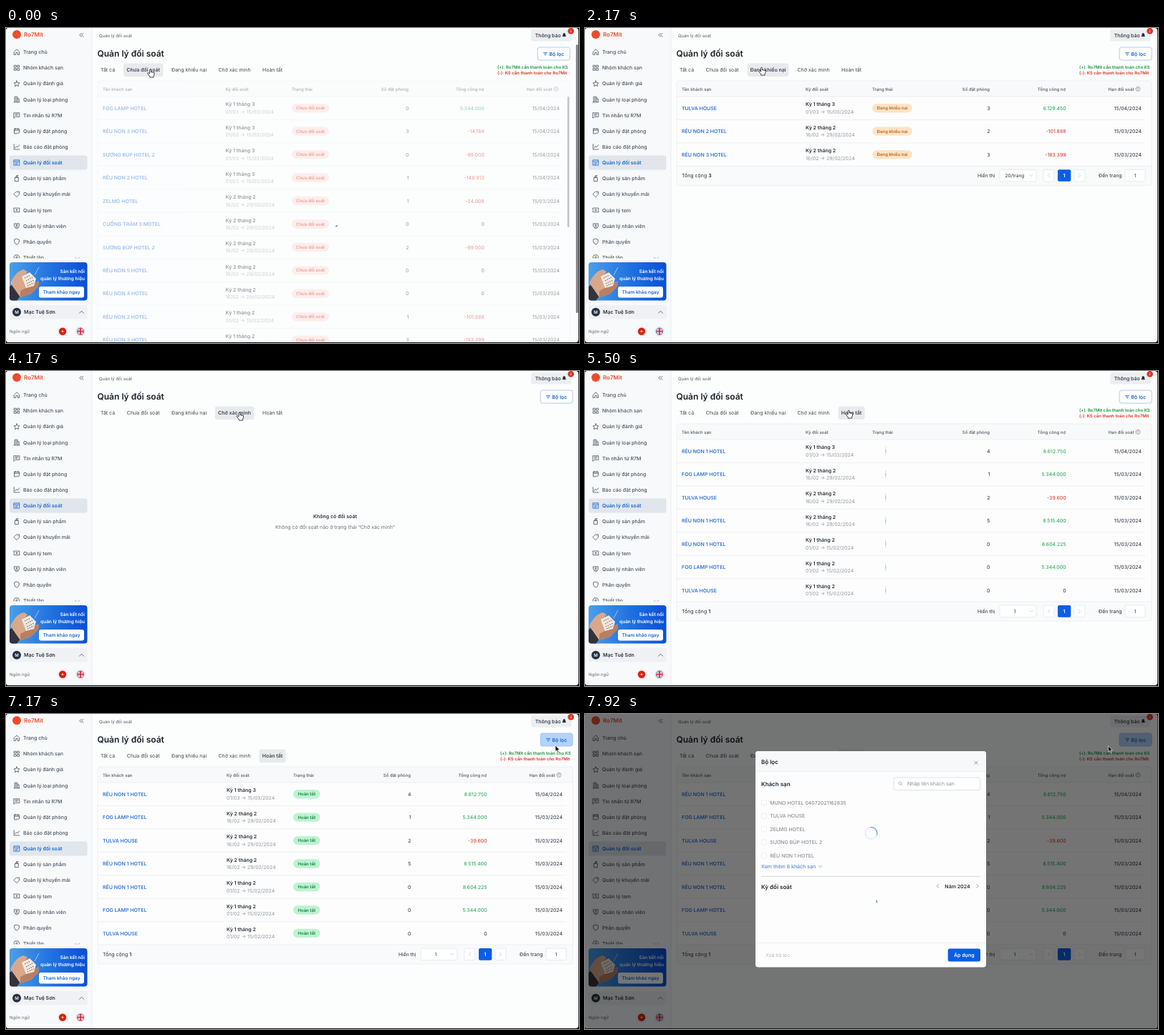
Animation of 800 by 441 pixels, one loop 8000 ms. Source, as an HTML page:

```html
<!DOCTYPE html>
<html lang="vi">
<head>
<meta charset="utf-8">
<title>Quản lý đối soát</title>
<style>
  html, body { margin: 0; width: 100%; height: 100%; overflow: hidden; background: #15171a; }
  svg { display: block; width: 800px; height: 441px; }
  text { font-family: Inter, sans-serif; text-rendering: geometricPrecision; white-space: pre; }
  .icon { fill: none; stroke: #46505e; stroke-width: .8; stroke-linecap: round; stroke-linejoin: round; }
  .badge { transform-box: fill-box; transform-origin: center; }
</style>
</head>
<body>
<svg id="stage" viewBox="0 0 800 441"></svg>
<script>
const LOOP = 8000;
const INK = '#28303b', GREY = '#9299a2', BLUE = '#1664d4', BUTTON = '#0b5de6',
      GREEN = '#16a34a', RED = '#d92d20', LINE = '#e8eaed', SCROLL = '#7d8085';

// Markup helpers
const text = (x, y, s, { size = 7, weight = 400, fill = INK, anchor = 'start' } = {}) =>
  `<text x="${x}" y="${y}" font-size="${size}" font-weight="${weight}" fill="${fill}" text-anchor="${anchor}">${s}</text>`;
const rect = (x, y, w, h, fill, rx = 0, stroke = 'none') =>
  `<rect x="${x}" y="${y}" width="${w}" height="${h}" rx="${rx}" fill="${fill}" stroke="${stroke}" stroke-width=".7"/>`;
const circle = (x, y, r, fill) => `<circle cx="${x}" cy="${y}" r="${r}" fill="${fill}"/>`;
const icon = (x, y, d, stroke = '#46505e') =>
  `<path class="icon" transform="translate(${x} ${y})" d="${d}" style="stroke:${stroke}"/>`;
const line = (x1, x2, y, stroke = LINE, w = .7) =>
  `<path d="M${x1} ${y}H${x2}" stroke="${stroke}" stroke-width="${w}"/>`;
const group = (id, body) => `<g id="${id}">${body}</g>`;

const LEFT = 'M1.2-2.4-1.2 0 1.2 2.4', RIGHT = 'M-1.2-2.4 1.2 0-1.2 2.4',
      DOWN = 'M-2-1 0 1 2-1', UP = 'M-3 1.5 0-1.5 3 1.5';

// Sidebar
const MENU = [
  ['Trang chủ', 'M-3.5-.5 0-3.8 3.5-.5V3.8H1.2V.8H-1.2v3H-3.5Z'],
  ['Nhóm khách sạn', 'M-3.5-3.5h2.6v2.6h-2.6ZM.9-3.5h2.6v2.6H.9ZM-3.5.9h2.6v2.6h-2.6ZM.9.9h2.6v2.6H.9Z'],
  ['Quản lý đánh giá', 'M0-4 1.2-1.3 4-1 1.9 1 2.5 3.8 0 2.3-2.5 3.8-1.9 1-4-1-1.2-1.3Z'],
  ['Quản lý loại phòng', 'M-3 3.8V-3.8H1V3.8M1-1H3.2V3.8M-4 3.8H4M-1.8-2h1.6M-1.8 0h1.6M-1.8 2h1.6'],
  ['Tin nhắn từ R7M', 'M-3.8-3.4H3.8V2.2H-1.8L-3.8 3.9ZM-2-1.6H2M-2 .2H1'],
  ['Quản lý đặt phòng', 'M-3.5-3H3.5V1M-3.5-3V3.6H.5M-3.5-1H3.5M-1.7-4v1.6M1.7-4v1.6M1 2.4 2.2 3.6 4 1.4'],
  ['Báo cáo đặt phòng', 'M-3.8-3.8V3.6H4M-2.4 1.6-.6-.8 1 .6 3.8-2.6'],
  ['Quản lý đối soát', 'M-3.7-3.7H3.7V3.7H-3.7ZM-3.7-1.7H3.7M-2 .2H1.8M-2 2H.8'],
  ['Quản lý sản phẩm', 'M-2.3-1.2H2.3V4H-2.3ZM-1.2-1.2V-2.8H1.2V-1.2M-.2-2.8V-4H2'],
  ['Quản lý khuyến mãi', 'M-.2-3.6 3.6-3.8 3.8 0-.2 3.8-3.9 0ZM1.7-1.9h.2'],
  ['Quản lý tem', 'M-3.9-2.8H3.9V-1Q2.9 0 3.9 1V2.8H-3.9V1Q-2.9 0-3.9-1ZM-1.2 0H1.2M0-1.2V1.2'],
  ['Quản lý nhân viên', 'M-3.3-3.2H3.3V.6Q3 2.6 0 4-3 2.6-3.3.6ZM-1-.9a1 1 0 1 0 2 0 1 1 0 1 0-2 0M-1.7 2Q0 .4 1.7 2'],
  ['Phân quyền', 'M0-4 3.3-2.8V0Q3 2.8 0 4-3 2.8-3.3 0V-2.8Z'],
  ['Thiết lập', 'M-2-3.4H2L4 0 2 3.4H-2L-4 0ZM-1.2 0a1.2 1.2 0 1 0 2.4 0 1.2 1.2 0 1 0-2.4 0'],
];

function menu() {
  return MENU.map(([label, d], i) => {
    const y = 33.6 + 22.13 * i, active = i === 7, color = active ? BLUE : '#46505e';
    return (active ? rect(5, y - 10, 108.5, 20, '#e0e6eb', 3) : '') + icon(15, y, d, color) +
      text(24, y + 2.6, label, { weight: active ? 600 : 500, fill: color });
  }).join('') + icon(99.5, 322.8, 'M-2.6-1.3 0 1.3 2.6-1.3');
}

function banner() {
  return rect(5, 328, 108.5, 53.5, 'url(#sky)', 4) +
    `<g clip-path="url(#bannerClip)">
      <path d="M5 362 11 358 20 375 15 382H5Z" fill="#34323d"/>
      <path d="M6 357Q14 340 25 338L30 341 25 348 40 357 46 354 45 362 35 372 20 377Z" fill="#d9a88c"/>
      <path d="M20 368 37 359 46 354 45 362 35 372 20 377Z" fill="#b97f62"/>
      <path d="M22 348 33 342 42 351 39 361 28 364Z" fill="#f1e8df"/>
      <path d="M26 350 34 346M28 354 37 349M29 358 39 353M30 361 39 357" stroke="#846f6a" stroke-width="1.2" stroke-dasharray="1.6 1.4"/>
      <path d="M40 346 46 335" stroke="#cfe3fb" stroke-width=".7"/>
    </g>` +
    text(110, 342.5, 'Sàn kết nối', { size: 6.5, weight: 600, fill: '#fff', anchor: 'end' }) +
    text(110, 352.5, 'quản lý thương hiệu', { size: 6.5, weight: 600, fill: '#fff', anchor: 'end' }) +
    rect(46, 362, 63, 15.5, '#fff', 3) +
    text(77.5, 372.1, 'Tham khảo ngay', { size: 6.5, weight: 600, fill: BLUE, anchor: 'middle' });
}

function flags() {
  const star = Array.from({ length: 10 }, (_, i) => {
    const r = i % 2 ? .9 : 2.2, a = Math.PI * (i / 5 - .5);
    return `${(79 + r * Math.cos(a)).toFixed(2)},${(424.7 + r * Math.sin(a)).toFixed(2)}`;
  }).join(' ');
  const cross = 'M98 424.7H110M104 418V431', diagonal = 'M99 420 109 430M109 420 99 430';
  return circle(79, 424.7, 7.5, '#eef0f2') + circle(104, 424.7, 7.5, '#eef0f2') +
    circle(79, 424.7, 5.2, '#d8201c') + `<polygon points="${star}" fill="#ffe14a"/>` +
    `<g clip-path="url(#flagClip)">${circle(104, 424.7, 6, '#21448f')}
      <path d="${diagonal}" stroke="#fff" stroke-width="1.8"/><path d="${diagonal}" stroke="#d3263a" stroke-width=".6"/>
      <path d="${cross}" stroke="#fff" stroke-width="3"/><path d="${cross}" stroke="#d3263a" stroke-width="1.7"/></g>`;
}

function sidebar() {
  return rect(0, 0, 120, 441, '#f8f9fb') + rect(119.6, 0, .7, 441, '#e4e7ea') +
    circle(15, 9, 6, '#ee4b2b') + text(25, 12.4, 'Ro7Mit', { size: 8, weight: 600, fill: '#ee4b2b' }) +
    icon(104, 9.7, LEFT) + icon(106.8, 9.7, LEFT) +
    `<g clip-path="url(#menuClip)">${menu()}</g>` + banner() +
    rect(5, 388, 108.5, 19.5, '#eff1f4', 3) + circle(15, 397.7, 6, '#273142') +
    text(15, 400, 'M', { size: 6, weight: 600, fill: '#fff', anchor: 'middle' }) +
    text(25, 400.3, 'Mạc Tuệ Sơn', { weight: 600 }) + icon(105.5, 397.7, UP) +
    text(5, 427, 'Ngôn ngữ', { size: 6, fill: '#5c6570' }) + flags();
}

// Tables
const PERIODS = {
  A: ['Kỳ 1 tháng 3', '01/03 → 15/03/2024', '15/04/2024'],
  B: ['Kỳ 2 tháng 2', '16/02 → 29/02/2024', '15/03/2024'],
  C: ['Kỳ 1 tháng 2', '01/02 → 15/02/2024', '15/03/2024'],
};
const FOG = 'FOG LAMP HOTEL', TULVA = 'TULVA HOUSE', BUD = 'SƯƠNG BÚP HOTEL 2', ZELMO = 'ZELMO HOTEL',
      moss = n => `RÊU NON ${n} HOTEL`;
const STATUS = {
  pending: ['Chưa đối soát', 52, '#fddcd8', '#d9341f'],
  dispute: ['Đang khiếu nại', 56, '#fde4c5', '#c5621c'],
  done: ['Hoàn tất', 37.5, '#bdf3d1', '#15803d'],
};
const ALL = [
  [FOG, 'A', 0, '5.344.000'], [moss(3), 'A', 3, '-14.184'], [BUD, 'A', 0, '-99.000'],
  [moss(2), 'A', 1, '-148.913'], [ZELMO, 'B', 1, '-24.008'], ['CUỐNG TRÀM 3 MOTEL', 'B', 0, '0'],
  [BUD, 'B', 2, '-99.000'], [moss(5), 'B', 0, '0'], [moss(4), 'B', 0, '0'],
  [moss(2), 'C', 1, '-101.888'], [moss(3), 'C', 3, '-183.399'],
];
const PENDING = [1, 2, 0, 3, 4, 6, 5, 7, 8, 9, 10].map(i => ALL[i]);
const DISPUTE = [[TULVA, 'A', 3, '6.129.450'], [moss(2), 'B', 2, '-101.888'], [moss(3), 'B', 3, '-183.399']];
const DONE = [
  [moss(1), 'A', 4, '8.612.750'], [FOG, 'B', 1, '5.344.000'], [TULVA, 'B', 2, '-39.600'],
  [moss(1), 'B', 5, '8.515.400'], [moss(1), 'C', 0, '8.604.225'], [FOG, 'C', 0, '5.344.000'], [TULVA, 'C', 0, '0'],
];
const NARROW = { period: 306.5, status: 399, count: 562.5, debt: 667.8, date: 773, right: 787 };
const WIDE = { period: 308, status: 401, count: 565.5, debt: 671.6, date: 777, right: 791.3 };
const PITCH = 32.45;

function row([name, key, count, debt], i, col, status) {
  const y = 112.2 + PITCH * i, [period, range, due] = PERIODS[key], [label, w, fill, ink] = STATUS[status];
  const debtColor = debt === '0' ? INK : debt[0] === '-' ? RED : GREEN;
  return text(135, y + 2.6, name, { weight: 500, fill: BLUE }) +
    text(col.period, y - 2.8, period, { weight: 600 }) + text(col.period, y + 7.5, range, { fill: GREY }) +
    `<g class="badge">${rect(col.status, y - 6.2, w, 12.4, fill, 6.2)}` +
    text(col.status + w / 2, y + 2.1, label, { size: 6, weight: 600, fill: ink, anchor: 'middle' }) + '</g>' +
    text(col.count, y + 2.6, count, { anchor: 'end' }) +
    text(col.debt, y + 2.6, debt, { fill: debtColor, anchor: 'end' }) +
    text(col.date, y + 2.6, due, { anchor: 'end' }) + line(128, col.right - 9, 96 + PITCH * (i + 1));
}

function pager(y, total, pageSize) {
  const box = (x, w) => rect(x, y - 8.3, w, 16.6, '#fff', 2, '#dfe2e6'), base = y + 2.6;
  return rect(128, y - 13.2, 663, 26.6, '#f9fafb', 3) + line(128, 791, y - 13.2) +
    text(135, base, `Tổng cộng <tspan font-weight="600">${total}</tspan>`) +
    text(548, base, 'Hiển thị', { size: 6.8 }) + box(579, 51) +
    text(600, base, pageSize, { size: 6.6, anchor: 'middle' }) + icon(623, y, DOWN, '#c3c8ce') +
    box(640, 15) + icon(647.5, y, LEFT, '#c3c8ce') +
    rect(660, y - 8.3, 18.3, 16.6, BUTTON, 2) + text(669, base, '1', { weight: 600, fill: '#fff', anchor: 'middle' }) +
    box(683, 15) + icon(690.5, y, RIGHT, '#c3c8ce') +
    text(717, base, 'Đến trang') + box(754, 28) + text(768, base, '1', { size: 6.6, anchor: 'middle' });
}

function table(id, rows, status, col, { footer, scroll }) {
  const head = (x, label, anchor) => text(x, 87.6, label, { size: 6, weight: 500, fill: '#4d5661', anchor });
  const height = footer ? PITCH * rows.length + 49 : 400, w = col.right - 128;
  return group(id,
    rect(128, 74, w, height, '#fdfdfe', 3) + rect(128, 74, w, 22, '#f8f9fa', 3) + line(128, col.right, 96) +
    head(135, 'Tên khách sạn') + head(col.period, 'Kỳ đối soát') + head(col.status, 'Trạng thái') +
    head(col.count - .5, 'Số đặt phòng', 'end') + head(col.debt - .5, 'Tổng công nợ', 'end') +
    head(col.date - 10.5, 'Hạn đối soát', 'end') +
    icon(col.date - 5, 85.3, 'M-3 0a3 3 0 1 0 6 0 3 3 0 1 0-6 0M-.9-.8Q-.6-1.7.3-1.5 1.2-1 0 0V.4M0 1.5v.1', '#8b929b') +
    rows.map((r, i) => row(r, i, col, status)).join('') +
    (footer ? pager(109.2 + PITCH * rows.length, ...footer) : rect(783.8, 96, 2.8, scroll, SCROLL, 1.4)) +
    rect(128, 74, w, height, 'none', 3, LINE));
}

// Page header
const TABS = [['Tất cả', 142, 28], ['Chưa đối soát', 191.7, 55.5], ['Đang khiếu nại', 255.6, 57.5],
              ['Chờ xác minh', 319, 54.5], ['Hoàn tất', 372, 37]];
function header() {
  const bell = 'M-2.7 1.7Q-1.9 1-1.9-.6-1.9-3 0-3.2 1.9-3 1.9-.6 1.9 1 2.7 1.7ZM-.7 2.8Q0 3.5.7 2.8Z';
  return text(130, 12.9, 'Quản lý đối soát', { size: 6, fill: '#4d5661' }) +
    text(127.5, 40, 'Quản lý đối soát', { size: 12, weight: 600, fill: '#1a212b' }) +
    rect(733, 2, 56.5, 16.5, '#eceef1', 3) + text(738.7, 12.8, 'Thông báo', { weight: 500 }) +
    `<path transform="translate(779.3 10.2)" d="${bell}" fill="${INK}"/>` + circle(788.7, 4.3, 4.3, '#e0301e') +
    text(788.7, 6, '2', { size: 4.6, fill: '#fff', anchor: 'middle' }) +
    TABS.map(([label, x, w], i) => `<g id="tab${i}">${rect(x - w / 2, 49.5, w, 18.5, '#e8eaed', 3)}` +
      text(x, 61.2, label, { anchor: 'middle', fill: '#3e4752' }) + '</g>').join('') +
    group('tools',
      `<rect id="filterBox" x="746.2" y="27" width="45" height="18" rx="3" stroke="#8fb5ee" stroke-width=".7"/>` +
      icon(757, 36.2, 'M-2.6-1.8H2.6M-1.6 0H1.6M-.6 1.8H.6', BLUE) +
      text(762.5, 38.7, 'Bộ lọc', { weight: 600, fill: BLUE }) +
      group('legend', text(690, 57, '(+): Ro7Mit cần thanh toán cho KS', { size: 6, weight: 600, fill: '#12953c' }) +
        text(690, 65, '(-): KS cần thanh toán cho Ro7Mit', { size: 6, weight: 600, fill: RED })));
}

const spinner = id => `<g id="${id}"><circle r="8.3" fill="none" stroke="#3f83e8" stroke-opacity=".22"/>
  <circle class="arc" r="8.3" fill="none" stroke-width="1.1" stroke-linecap="round"/></g>`;

// Filter dialog
function modal() {
  const title = (y, s) => text(246, y, s, { size: 8, weight: 600, fill: '#1f2731' });
  const hotels = ['MUNO HOTEL 04072021162835', TULVA, ZELMO, BUD, moss(1)];
  return group('modal',
    rect(238, 52, 322, 302.5, '#fdfdfe', 4) + rect(238, 52, 322, 28.5, '#f7f8fa', 4) + line(238, 560, 80.5) +
    title(69.6, 'Bộ lọc') + icon(546, 68.2, 'M-2.2-2.2 2.2 2.2M2.2-2.2-2.2 2.2', '#7e858e') + title(100.6, 'Khách sạn') +
    rect(431.3, 89, 120.5, 17.5, '#fff', 2, '#d3d7dc') + icon(440.5, 97.5, 'M-2.3-.4a2 2 0 1 0 4 0 2 2 0 1 0-4 0M1.2 1 2.6 2.4', '#a5abb3') +
    text(450, 100.3, 'Nhập tên khách sạn', { fill: '#858c95' }) +
    '<g opacity=".62">' + hotels.map((name, i) => rect(246.5, 120.5 + 18.55 * i, 7, 7, '#fff', 1.5, '#d9dde1') +
      text(258.3, 126.8 + 18.55 * i, name)).join('') + '</g>' +
    '<g opacity=".75">' + text(246, 216, 'Xem thêm 6 khách sạn', { weight: 500, fill: BLUE }) + icon(328.5, 213.7, DOWN, BLUE) + '</g>' +
    line(246, 552, 227.3, '#d5d8dc', 1) + title(244.6, 'Kỳ đối soát') +
    icon(492.5, 240.8, LEFT, '#7e858e') + text(520, 243.6, 'Năm 2024', { weight: 600, anchor: 'middle' }) + icon(548, 240.8, RIGHT, '#7e858e') +
    line(238, 560, 320.5) + text(252, 340, 'Xoá bộ lọc', { fill: '#b3b8be', size: 6.8 }) +
    rect(506.7, 328.5, 45.3, 18, BUTTON, 2.5) + text(529.3, 340.1, 'Áp dụng', { weight: 600, fill: '#fff', anchor: 'middle' }) +
    spinner('hotelSpin') + spinner('periodSpin'));
}

const HAND = 'M-1 1.2V6l-1.6-1.2c-.9-.5-1.7.4-1.1 1.2L-.8 9.6V11h5.4V9.4c.6-1 .9-2 .9-3.4V4.6c0-1-1.3-1-1.3-.1 0-1-1.5-1-1.5-.2 0-1-1.6-1-1.6-.2V1.2C1.1-.2-1-.2-1 1.2Z';
const ARROW = 'M0 0V8.4L2 6.7 3.3 9.8 4.6 9.2 3.4 6.3H6Z';

document.getElementById('stage').innerHTML = `
  <defs>
    <linearGradient id="sky"><stop stop-color="#4a9fe8"/><stop offset=".5" stop-color="#2374e0"/><stop offset="1" stop-color="#0a4fd6"/></linearGradient>
    <clipPath id="frameClip"><rect width="799.2" height="440" rx="4"/></clipPath>
    <clipPath id="menuClip"><rect width="120" height="322.5"/></clipPath>
    <clipPath id="bannerClip"><rect x="5" y="328" width="108.5" height="53.5" rx="4"/></clipPath>
    <clipPath id="flagClip"><circle cx="104" cy="424.7" r="5.2"/></clipPath>
  </defs>
  <g clip-path="url(#frameClip)">` +
  rect(0, 0, 800, 441, '#fcfdfd') + sidebar() + header() +
  group('content',
    table('all', ALL, 'pending', NARROW, { scroll: 183 }) + table('pending', PENDING, 'pending', NARROW, { scroll: 304 }) +
    table('dispute', DISPUTE, 'dispute', WIDE, { footer: [3, '20/trang'] }) + table('done', DONE, 'done', WIDE, { footer: [1, '1'] }) +
    group('empty', text(459.5, 205.8, 'Không có đối soát', { weight: 600, anchor: 'middle' }) +
      text(459.5, 221, 'Không có đối soát nào ở trạng thái “Chờ xác minh”', { fill: '#69717b', anchor: 'middle' }))) +
  spinner('pageSpin') + group('pageScroll', rect(795.8, 23, 3, 376, SCROLL, 1.5)) +
  '<rect id="mask" width="800" height="441"/>' + modal() +
  `<g id="cursor"><path id="hand" d="${HAND}" fill="#fff" stroke="#111" stroke-width=".8"/>
    <path id="arrow" d="${ARROW}" fill="#111" stroke="#fff" stroke-width=".6"/></g></g>`;

// Timeline
const SCENES = [[0, 'all', 270], [500, 'pending', 270], [1900, 'dispute', 147], [3500, 'empty', 212], [5420, 'done', 212]];
const ACTIVE_TAB = [[0, 1], [1380, 2], [3080, 3], [4850, 4]];
const LOADS = [[-320, 500], [1380, 1900], [3080, 3500], [4850, 5420]];
const PATH = [[0, 201.5, 58], [700, 201.5, 58], [1120, 246.5, 55], [2600, 246.5, 55], [2980, 326, 58],
  [4300, 326, 58], [4680, 368, 55], [6050, 368, 55], [6850, 767, 44], [7400, 767, 44], [7860, 730.5, 44.5], [LOOP, 730.5, 44.5]];
const OPEN_AT = 7190, OPEN_TIME = 300, PERIOD_LOAD_AT = 7880;
const NEW_BADGES = ['dispute', 'done'];

const $ = id => document.getElementById(id);
const clamp = v => Math.max(0, Math.min(1, v));
const ease = v => v * v * (3 - 2 * v);
const latest = (list, t) => list.filter(e => e[0] <= t).pop();
const show = (id, on) => { $(id).style.display = on ? '' : 'none'; };

function cursorAt(t) {
  const i = PATH.findIndex(p => p[0] > t), [t0, x0, y0] = PATH[i - 1], [t1, x1, y1] = PATH[i];
  const k = ease((t - t0) / (t1 - t0));
  return [x0 + (x1 - x0) * k, y0 + (y1 - y0) * k];
}

function spin(id, x, y, age, from = 45) {
  const el = $(id), arc = el.querySelector('.arc'), grow = clamp(age / 500);
  show(id, age >= 0);
  el.setAttribute('transform', `translate(${x} ${y}) rotate(${from + age * .3})`);
  el.firstElementChild.style.opacity = grow;
  arc.setAttribute('stroke-dasharray', `${2 + 14 * grow} 60`);
  arc.setAttribute('stroke', grow < .4 ? '#4a6f9f' : '#4f92ee');
}

function draw(t) {
  const [since, scene, spinY] = latest(SCENES, t), [, active] = latest(ACTIVE_TAB, t), [cx, cy] = cursorAt(t);
  SCENES.forEach(s => show(s[1], s[1] === scene));
  const narrow = scene === 'all' || scene === 'pending';
  show('pageScroll', narrow);
  show('legend', scene !== 'empty');
  $('tools').setAttribute('transform', `translate(${narrow ? -4 : 0} 0)`);

  // Badges of a newly mounted table widen from their centre.
  const widen = NEW_BADGES.includes(scene) ? ease(clamp((t - since - 60) / 200)) : 1;
  $(scene).querySelectorAll('.badge').forEach(b => { b.style.transform = `scaleX(${widen})`; });

  TABS.forEach(([, x, w], i) => {
    const [box, label] = $('tab' + i).children;
    const hover = Math.abs(cx - x) < w / 2 && cy > 49 && cy < 68;
    box.style.opacity = i === active ? 1 : hover ? .4 : 0;
    label.setAttribute('font-weight', i === active ? 600 : 400);
  });
  const overFilter = t >= OPEN_AT || (cx > 746 && cy < 46);
  $('filterBox').setAttribute('fill', overFilter ? '#b4d3fa' : '#fff');

  const [start, end] = latest(LOADS, t), loading = t < end;
  $('content').style.opacity = loading ? 1 - .55 * clamp((t - start) / 300) : 1;
  spin('pageSpin', narrow ? 457.5 : 459.5, spinY, loading ? t - start - 300 : -1);

  const open = ease(clamp((t - OPEN_AT) / OPEN_TIME)), scale = .2 + .8 * open;
  $('mask').style.opacity = .54 * open;
  show('modal', open > 0);
  $('modal').style.opacity = open;
  $('modal').setAttribute('transform', `translate(768 47) scale(${scale}) translate(-768 -47)`);
  spin('hotelSpin', 399.5, 166.8, t - OPEN_AT);
  spin('periodSpin', 399.7, 265.5, t - PERIOD_LOAD_AT, -45);

  $('cursor').setAttribute('transform', `translate(${cx} ${cy})`);
  const onTabs = cx < 391;
  show('hand', onTabs);
  show('arrow', !onTabs);
}

function tick() {
  draw(performance.now() % LOOP);
  requestAnimationFrame(tick);
}
tick();
</script>
</body>
</html>
```
